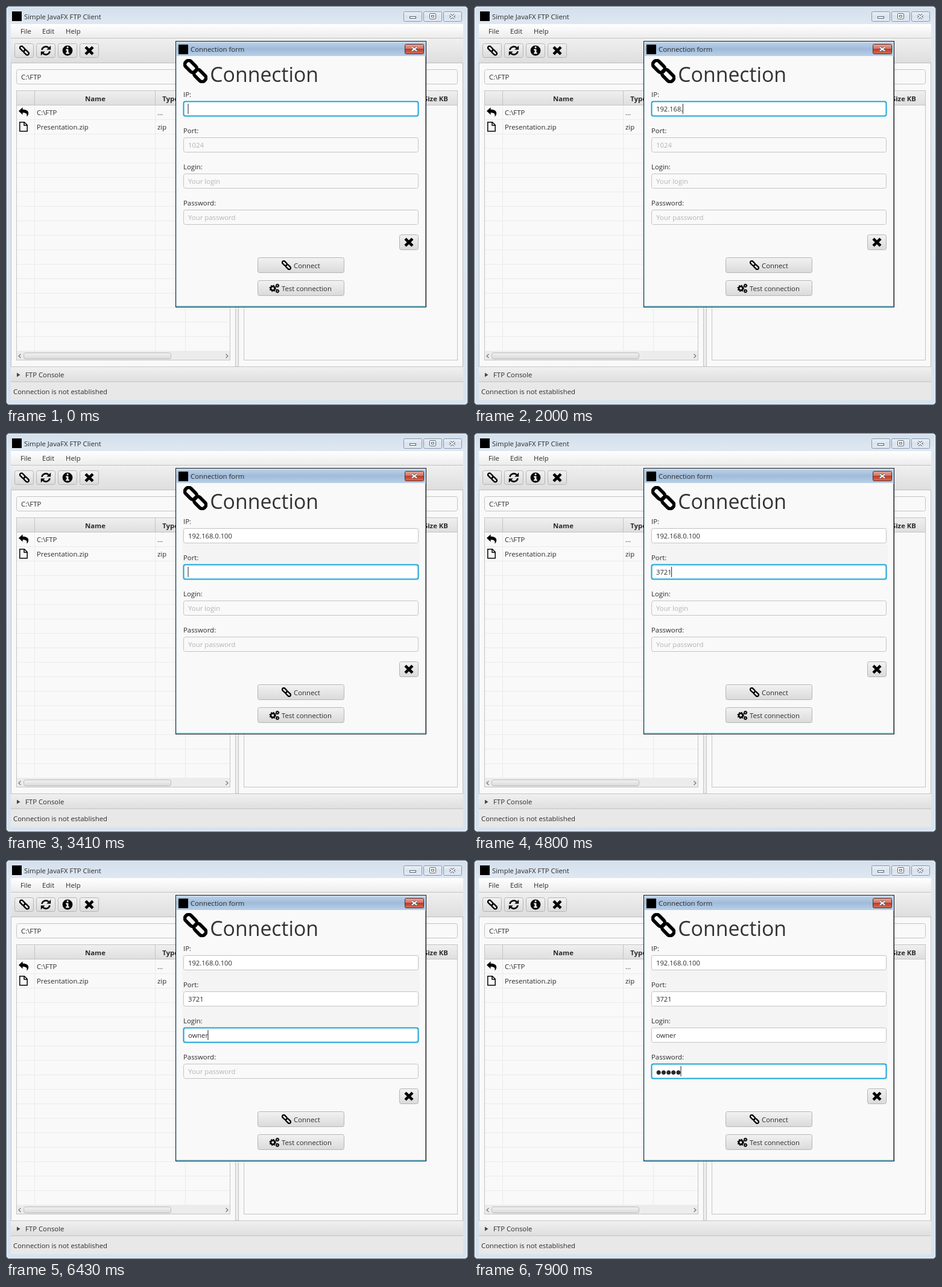
These frames come from a looping animation (766x662 px, 8 s). An HTML page:

```html
<!DOCTYPE html>
<html lang="en">
<head>
<meta charset="utf-8">
<title>FTP connection form</title>
<style>
  html, body { margin: 0; width: 100%; height: 100%; overflow: hidden; }
  svg { display: block; width: 766px; height: 662px; }
  text { font: 11.36px "Open Sans", "Noto Sans", sans-serif; fill: #2b2b2b; white-space: pre; }
  .bold { font-weight: 700; }
  .heading { font-size: 33.8px; fill: #333; }
  .value { font-size: 11.2px; }
  .hint { fill: #b4b4b4; }
  .mask { font: 9.42px "DejaVu Sans", sans-serif; }
  .line { fill: none; stroke: #c4c4c4; }
  .grid { fill: none; stroke: #ebebeb; }
  .button { fill: url(#buttonFill); stroke: #b5b5b5; }
  .input { fill: #f9f9f9; stroke: #c4c4c4; }
  .control { fill: url(#controlFill); stroke: #8997a8; }
</style>
</head>
<body>
<svg viewBox="0 0 766 662" xmlns="http://www.w3.org/2000/svg">
  <defs>
    <linearGradient id="frameFill" x2="0" y2="1">
      <stop stop-color="#d3dfec"/><stop offset=".045" stop-color="#dfe8f2"/><stop offset="1" stop-color="#d7e3f0"/>
    </linearGradient>
    <linearGradient id="menuFill" x2="0" y2="1">
      <stop stop-color="#fff"/><stop offset="1" stop-color="#ececec"/>
    </linearGradient>
    <linearGradient id="barFill" x2="0" y2="1">
      <stop stop-color="#f0f0f0"/><stop offset="1" stop-color="#dedede"/>
    </linearGradient>
    <linearGradient id="buttonFill" x2="0" y2="1">
      <stop stop-color="#f2f2f2"/><stop offset="1" stop-color="#dadada"/>
    </linearGradient>
    <linearGradient id="controlFill" x2="0" y2="1">
      <stop stop-color="#eaf0f7"/><stop offset=".5" stop-color="#dae4ef"/><stop offset="1" stop-color="#e2ebf4"/>
    </linearGradient>
    <linearGradient id="dialogFill" x2="0" y2="1">
      <stop stop-color="#c2d4e8"/><stop offset=".5" stop-color="#9fbbd9"/><stop offset="1" stop-color="#b9d0e8"/>
    </linearGradient>
    <linearGradient id="closeFill" x2="0" y2="1">
      <stop stop-color="#e6a497"/><stop offset=".48" stop-color="#d07363"/><stop offset=".5" stop-color="#bd3b24"/><stop offset="1" stop-color="#d5705a"/>
    </linearGradient>

    <symbol id="link" viewBox="0 0 40 40">
      <g fill="none" stroke="#000" stroke-width="5.6">
        <rect x="-11.2" y="-6.2" width="22.4" height="12.4" rx="5.6" transform="translate(12.4 12.4) rotate(45)"/>
        <rect x="-11.2" y="-6.2" width="22.4" height="12.4" rx="5.6" transform="translate(27.6 27.6) rotate(45)"/>
      </g>
    </symbol>
    <symbol id="cross" viewBox="-8 -8 16 16">
      <path d="M-5.6-5.6L5.6 5.6M5.6-5.6L-5.6 5.6" stroke="#000" stroke-width="4.4"/>
    </symbol>
    <symbol id="smallCross" viewBox="-6 -5 12 10">
      <path d="M-4-3L4 3M4-3L-4 3" stroke="#59616b" stroke-width="4"/>
      <path d="M-4-3L4 3M4-3L-4 3" stroke="#fff" stroke-width="2"/>
    </symbol>
  </defs>

  <!-- Main window -->
  <rect width="766" height="662" fill="#3c444c"/>
  <rect x=".5" y=".5" width="765" height="661" rx="5" fill="url(#frameFill)" stroke="#5d6873"/>
  <rect x="1.5" y="1.5" width="763" height="659" rx="4" fill="none" stroke="#eef4fa"/>
  <rect x="10" y="9" width="16" height="16"/>
  <text x="30" y="22">Simple JavaFX FTP Client</text>
  <rect class="control" x="659.5" y="9.5" width="30" height="16" rx="2"/>
  <rect class="control" x="692.5" y="9.5" width="30" height="16" rx="2"/>
  <rect class="control" x="725.5" y="9.5" width="30" height="16" rx="2"/>
  <g fill="#fff" stroke="#59616b">
    <rect x="669.5" y="17.5" width="10" height="3"/>
    <rect x="702.5" y="12.5" width="10" height="9" rx="1"/>
    <rect x="705.5" y="15.5" width="4" height="3"/>
  </g>
  <use href="#smallCross" x="734" y="12.5" width="12" height="10"/>

  <rect x="8" y="30" width="750" height="624" fill="#f4f4f4"/>
  <rect x="8" y="30" width="750" height="23" fill="url(#menuFill)"/>
  <text x="24" y="46">File</text>
  <text x="60" y="46">Edit</text>
  <text x="99" y="46">Help</text>

  <rect x="8" y="53" width="750" height="41" fill="url(#barFill)"/>
  <path class="line" d="M8 53.5H758"/>
  <g id="toolButtons"></g>
  <use href="#link" x="22" y="65.5" width="17" height="17"/>
  <g transform="translate(66 74)">
    <g id="halfTurn">
      <path d="M-6.6-1.2A6.8 6.8 0 0 1 4.6-4.8" fill="none" stroke="#000" stroke-width="2.6"/>
      <path d="M8.2-8.2V-1.4H1.4Z"/>
    </g>
    <use href="#halfTurn" transform="rotate(180)"/>
  </g>
  <circle cx="102" cy="74" r="8.4"/>
  <path d="M100.8 67.3h2.6v2.6h-2.6zM99.2 71.6h4.2v5.6h1.4v2h-5.6v-2h1.4v-3.6h-1.4z" fill="#fff"/>
  <use href="#cross" x="129.5" y="65.5" width="17" height="17"/>

  <!-- File panels -->
  <rect x="8.5" y="94.5" width="749" height="504" fill="#f9f9f9" stroke="#c0c0c0"/>
  <rect x="380.5" y="95" width="5" height="503" fill="#ececec" stroke="#c4c4c4"/>
  <rect class="input" x="17.5" y="105.5" width="354" height="24" rx="3"/>
  <rect class="input" x="394.5" y="105.5" width="354" height="24" rx="3"/>
  <text x="25" y="122">C:\FTP</text>
  <path id="rowLines" class="grid"/>
  <path class="grid" d="M47.5 165V573M247.5 165V573M297.5 165V573"/>
  <rect x="17" y="140" width="355" height="25" fill="url(#barFill)"/>
  <rect x="394" y="140" width="355" height="25" fill="url(#barFill)"/>
  <path class="line" d="M17 164.5H372M394 164.5H749M47.5 141V164M247.5 141V164M297.5 141V164"/>
  <rect x="18" y="573" width="354" height="15" fill="#ececec"/>
  <rect x="29.5" y="575.5" width="244" height="10" rx="3" fill="url(#buttonFill)" stroke="#bbb"/>
  <path d="M24.5 577.5L21 580.7L24.5 584M364.5 577.5L368 580.7L364.5 584" fill="none" stroke="#777" stroke-width="1.2"/>
  <rect class="line" x="17.5" y="140.5" width="354" height="447"/>
  <rect class="line" x="394.5" y="140.5" width="354" height="447"/>
  <text class="bold" x="148" y="158" text-anchor="middle">Name</text>
  <text class="bold" x="272.5" y="158" text-anchor="middle">Type</text>
  <text class="bold" x="733" y="158" text-anchor="end">Size KB</text>
  <path d="M21 174.3L27.6 168.3V171.7C34 171.7 37.6 174 37.2 178.4C37 180.8 35.8 182.5 34.3 183.6C35.7 179 33.6 177 27.6 177V180.4Z"/>
  <path d="M22.8 192.8H30.5L35.2 197.5V207.7H22.8ZM30 193V198H35" fill="none" stroke="#000" stroke-width="1.5"/>
  <text x="51" y="181">C:\FTP</text>
  <text x="251" y="181">...</text>
  <text x="51" y="205">Presentation.zip</text>
  <text x="251" y="205">zip</text>

  <rect x="8" y="599" width="750" height="25" fill="url(#barFill)"/>
  <path d="M18 608.5L23.5 612L18 615.5Z" fill="#444"/>
  <text x="32" y="616">FTP Console</text>
  <rect x="8" y="624" width="750" height="30" fill="#e8e8e8"/>
  <path class="line" d="M8 598.5H758M8 623.5H758"/>
  <text x="12" y="644">Connection is not established</text>

  <!-- Dialog -->
  <rect x="281.5" y="58.5" width="415" height="441" fill="#f9f9f9" stroke="#0c1218"/>
  <rect x="282" y="59" width="414" height="24" fill="url(#dialogFill)"/>
  <path d="M282.5 498V59.5H695.5V498" fill="none" stroke="#d8eaf6"/>
  <path d="M695.5 84V498M282 498H696" fill="none" stroke="#35bfe8"/>
  <rect x="286" y="64" width="16" height="16"/>
  <text x="306" y="76">Connection form</text>
  <rect x="661.5" y="63.5" width="31" height="16" rx="2" fill="url(#closeFill)" stroke="#5b2a26"/>
  <use href="#smallCross" x="671" y="66.5" width="12" height="10"/>
  <use href="#link" x="294" y="88" width="40" height="40"/>
  <text class="heading" x="338.2" y="126">Connection</text>

  <rect id="refreshed" x="292" y="157" width="394" fill="#f4f4f4"/>
  <g id="form"></g>
  <rect id="caret" width="1" height="17" fill="#222"/>

  <rect class="button" x="652.5" y="379.5" width="31" height="25" rx="3"/>
  <use href="#cross" x="659.5" y="383.5" width="17" height="17"/>
  <rect class="button" x="417.5" y="417.5" width="143" height="25" rx="3"/>
  <use href="#link" x="457" y="422" width="16" height="16"/>
  <text x="477" y="435">Connect</text>
  <rect class="button" x="417.5" y="455.5" width="143" height="25" rx="3"/>
  <g fill="none" stroke="#000">
    <circle cx="442.3" cy="468.5" r="3.4" stroke-width="2.6"/>
    <circle cx="442.3" cy="468.5" r="5" stroke-width="1.6" stroke-dasharray="1.96"/>
    <g stroke-width="1.7">
      <circle cx="450" cy="464" r="1.8"/>
      <circle cx="450" cy="473" r="1.8"/>
      <circle cx="450" cy="464" r="2.9" stroke-width="1" stroke-dasharray="1.14"/>
      <circle cx="450" cy="473" r="2.9" stroke-width="1" stroke-dasharray="1.14"/>
    </g>
  </g>
  <text x="457" y="473">Test connection</text>
</svg>

<script>
const LOOP = 8000;
const TEXT_X = 302;
const byId = id => document.getElementById(id);

function add(parent, tag, attrs, content = '') {
  const node = document.createElementNS('http://www.w3.org/2000/svg', tag);
  for (const name in attrs) node.setAttribute(name, attrs[name]);
  node.textContent = content;
  return parent.appendChild(node);
}

for (let i = 0; i < 4; i++) {
  add(byId('toolButtons'), 'rect', { class: 'button', x: 14.5 + 36 * i, y: 62.5, width: 31, height: 23, rx: 3 });
}
byId('rowLines').setAttribute('d',
  Array.from({ length: 17 }, (_, i) => `M18 ${188.5 + 24 * i}H371`).join(''));

// focus: gains focus; blink: caret goes out until the first key; keys: one time per typed character
const fields = [
  { label: 'IP:', hint: '', value: '192.168.0.100', focus: 0, blink: 150,
    keys: [335, 520, 800, 950, 1260, 1570, 1690, 2000, 2120, 2430, 2830, 2965, 3100] },
  { label: 'Port:', hint: '1024', value: '3721', focus: 3410, blink: 3870,
    keys: [4120, 4400, 4600, 4800] },
  { label: 'Login:', hint: 'Your login', value: 'owner', focus: 5080, blink: 5510,
    keys: [5740, 5910, 6090, 6260, 6430] },
  { label: 'Password:', hint: 'Your password', value: '●●●●●', masked: true, focus: 6550, blink: 7110,
    keys: [7110, 7230, 7350, 7620, 7900] }
];

fields.forEach((field, i) => {
  const form = byId('form');
  field.top = 158 + 60 * i;
  add(form, 'text', { x: 294, y: field.top - 7 }, field.label);
  field.box = add(form, 'rect', { class: 'input', x: 294.5, y: field.top + .5, width: 389, height: 24, rx: 3 });
  field.hintText = add(form, 'text', { class: 'hint', x: TEXT_X, y: field.top + 17 }, field.hint);
  field.text = add(form, 'text', {
    class: field.masked ? 'mask' : 'value',
    x: TEXT_X,
    y: field.top + (field.masked ? 196.5 - 180 : 17)
  });
});

function render(t) {
  const active = fields.filter(field => t >= field.focus).length - 1;

  fields.forEach((field, i) => {
    const reached = i <= active;
    const focused = i === active;
    const typed = field.keys.filter(time => t >= time).length;
    field.text.textContent = field.value.slice(0, typed);
    field.hintText.style.display = reached ? 'none' : '';
    field.box.style.fill = reached ? '#fff' : '';
    field.box.style.stroke = focused ? '#1ba6d8' : '';
    field.box.style.strokeWidth = focused ? 2 : 1;
  });

  const { top, text, blink, keys } = fields[active];
  const caret = byId('caret');
  const length = text.textContent ? text.getComputedTextLength() : 0;
  caret.setAttribute('x', TEXT_X - .5 + length);
  caret.setAttribute('y', top + 4);
  caret.style.display = t >= blink && t < keys[0] ? 'none' : '';

  byId('refreshed').setAttribute('height', active ? 28 + 60 * active : 0);
}

function tick() {
  render(performance.now() % LOOP);
  requestAnimationFrame(tick);
}
tick();
</script>
</body>
</html>
```
